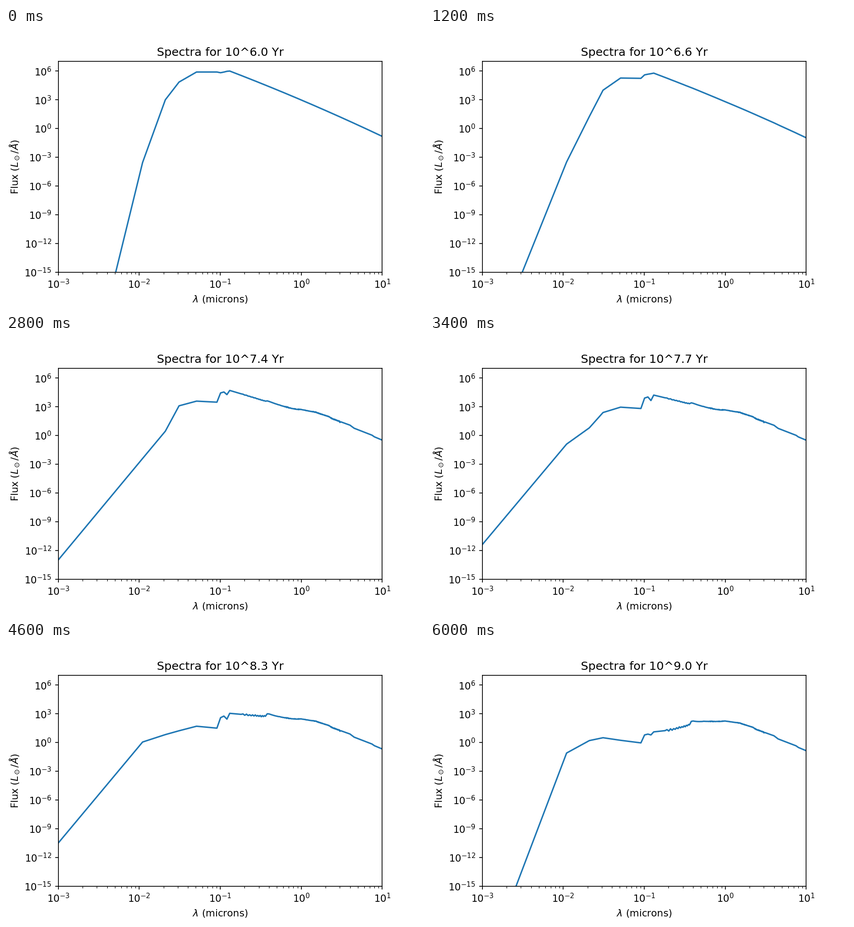
These frames come from a looping animation (917x611 px, 6200 ms). A matplotlib script:

```python
import numpy as np
import matplotlib.pyplot as plt
from matplotlib.animation import FuncAnimation
from matplotlib.ticker import NullLocator

W, H, DPI = 917, 611, 152.75
FRAMES, STEP_MS = 31, 200

# extreme-UV log flux: wavelength -> level at each log age
AGES = [6.0, 6.3, 6.9, 7.4, 8.0, 8.6, 9.0]
EUV = {
    0.001: [-39.5, -39.5, -11.3, -13.0, -9.8, -11.2, -24.3],
    0.011: [-3.55, -4.95, -2.05, -2.4, 0.6, -0.5, -1.1],
    0.021: [3.0, 1.75, 0.75, 0.45, 1.15, 0.5, 0.2],
    0.031: [4.85, 4.15, 3.85, 3.1, 1.7, 0.75, 0.5],
}

# log flux of the cool giants
GIANT_WL = [0.2, 0.4, 0.55, 1, 1.5, 2.2, 2.4, 4, 4.5, 7.5, 8, 10]
GIANT_FLUX = [1.0, 2.1, 2.45, 2.58, 2.38, 1.93, 1.72, 1.05, 0.72, 0, -0.17, -0.51]

wl = np.concatenate([np.arange(0.001, 3.005, 0.01), np.arange(3.1, 10.01, 0.1)])
x = np.log10(wl)
uv = wl < 0.1

hot_shape = 2.98 - 3.6 * x - 0.2 * x**2 - 20 * np.clip(0.128 - wl, 0, None)
giant_shape = np.interp(x, np.log10(GIANT_WL), GIANT_FLUX)
balmer = np.clip((0.381 - wl) / 0.02, 0, 1)
reddening = np.clip(np.log10(0.4 / wl), 0, None) + 0.12 * balmer
lyman_alpha = abs(wl - 0.121) < 0.002

# sawtooth metal lines and ripples of the molecular bands
rng = np.random.default_rng(4)
saw = np.cos(np.pi * (np.arange(len(wl)) - 21)) * rng.uniform(0.5, 1.3, len(wl))
metals = 0.024 * saw * ((wl > 0.19) & (wl < 0.36))
sigma = np.select([(wl > .63) & (wl < .95), (wl > 1.38) & (wl < 1.75),
                   (wl > 2.3) & (wl < 3), (wl > .5) & (wl < 2.3)],
                  [.045, .035, .025, .013], 0)
bands = sigma * np.clip(rng.standard_normal(len(wl)), -1.8, 1.8)
bands[abs(wl - 3.001) < 0.002] = -0.18


def euv(age):
    fade = max(age - 6.3, 0)
    level = [np.interp(age, AGES, track) for track in EUV.values()]
    level += [5.9 - 2.1 * fade, 5.9 - 2.2 * fade]
    return np.interp(x, np.log10([*EUV, 0.051, 0.091]), level)


def spectrum(age):
    cooling = 0.63 * max(age - 6.3, 0) ** 2
    hot = np.interp(age, [6, 6.3, 6.9, 8.4, 9], [0, 0.13, -0.5, -1.5, -2.3])
    cool = np.interp(age, [6.3, 6.9, 7.4, 8, 8.6], [-4, 0.9, 0, 0, -0.35])

    stars = hot_shape + hot + cooling * (metals - reddening)
    stars -= 0.5 * min(cooling, 1) * lyman_alpha
    ripple = np.clip(0.55 + 0.5 * cool, 0, 1) * bands
    total = (10**stars + 10 ** (giant_shape + cool)) * 10**ripple
    return np.where(uv, 10 ** euv(age), total)


fig, ax = plt.subplots(figsize=(W / DPI, H / DPI), dpi=DPI)
fig.subplots_adjust(left=0.125, right=0.9, bottom=0.125, top=0.88)
ax.set_xscale("log")
ax.set_yscale("log")
ax.set_xlim(1e-3, 1e1)
ax.set_ylim(1e-15, 1e7)
ax.set_yticks(10.0 ** np.arange(-15, 7, 3))
ax.yaxis.set_minor_locator(NullLocator())
ax.set_xlabel(r"$\lambda$ (microns)")
ax.set_ylabel(r"Flux ($L_\odot/\AA$)", labelpad=3.3)
curve, = ax.plot(wl, spectrum(6), color="#1f77b4", lw=1.5)
title = ax.set_title("")


def update(i):
    age = 6 + i / 10
    curve.set_ydata(spectrum(age))
    title.set_text(f"Spectra for 10^{age:.1f} Yr")
    return curve, title


anim = FuncAnimation(fig, update, frames=FRAMES, interval=STEP_MS,
                     repeat=True, repeat_delay=0)
plt.show()
```
